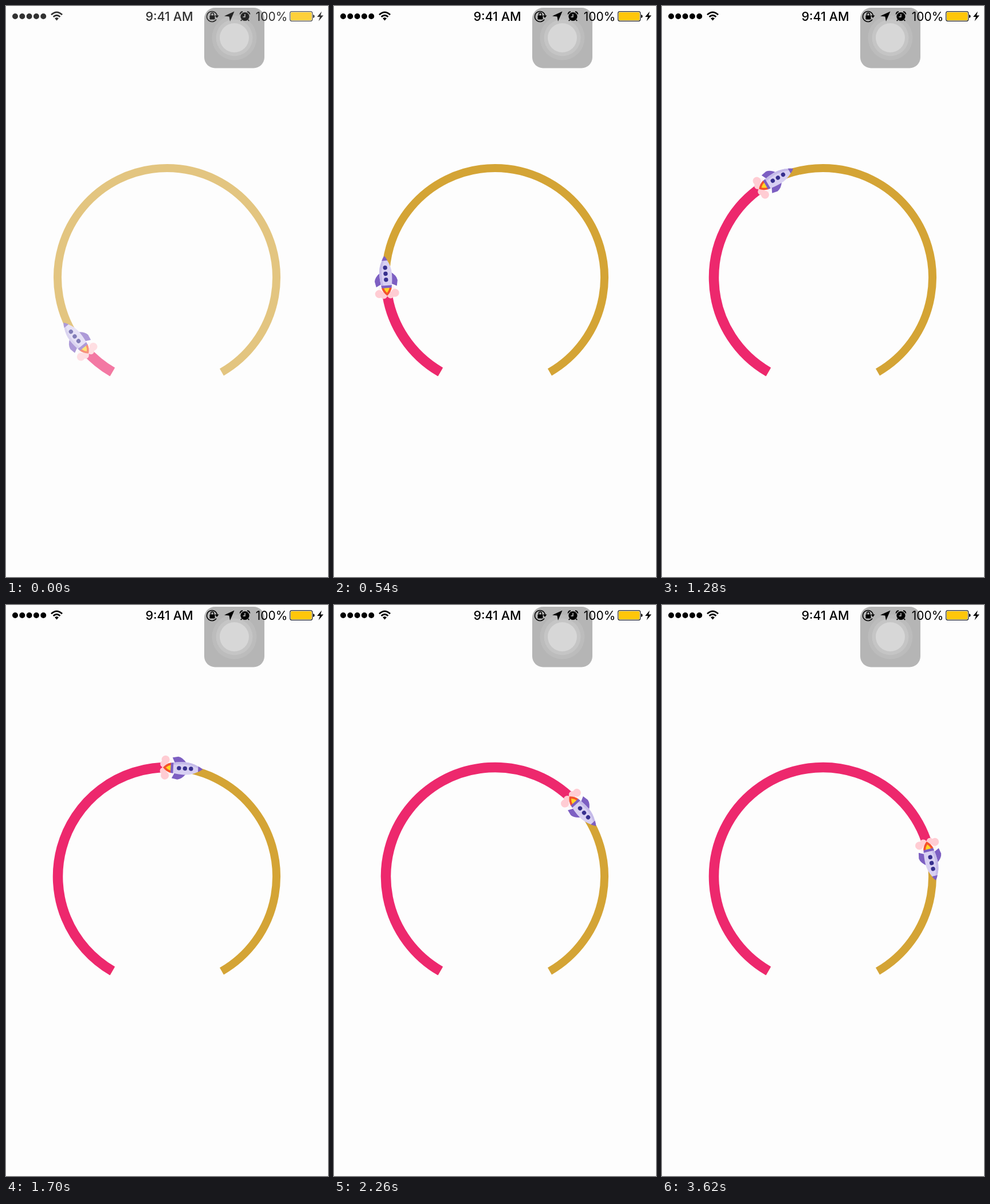
These frames come from a looping animation (562x997 px, 3720 ms). An HTML page:

```html
<!DOCTYPE html>
<html>
<head>
<meta charset="utf-8">
<style>
html, body { margin: 0; width: 100%; height: 100%; overflow: hidden; background: #fdfdfd; }
svg { display: block; width: 100vw; height: 100vh; }
text { font-family: Inter, "Liberation Sans", sans-serif; text-anchor: middle; }
</style>
</head>
<body>
<svg viewBox="0 0 562 997">
  <rect width="562" height="997" fill="#fdfdfd"/>

  <g id="gauge" fill="none">
    <path id="track" stroke="#d4a435" stroke-width="14"/>
    <path id="bar" stroke="#ed286d" stroke-width="17.5"/>
    <g id="rocket">
      <path fill="#fdf3f5" d="M-12 16H12L17 23L12 33H-12L-17 23Z"/>
      <g fill="#ffccd3">
        <circle cx="-14" cy="28" r="7"/>
        <circle cx="14" cy="28" r="7"/>
        <circle cx="-6" cy="31" r="6"/>
        <circle cx="6" cy="31" r="6"/>
      </g>
      <path fill="#f4512c" d="M-9 18H9Q7 26 0 32Q-7 26 -9 18Z"/>
      <path fill="#ffd526" d="M-5 18H5Q4 23 0 27Q-4 23 -5 18Z"/>
      <path fill="#7d5fc2" d="M-9 -9Q-19 -2 -20 6L-18 16L-8 11ZM9 -9Q19 -2 20 6L18 16L8 11Z"/>
      <path fill="#d8d0f2" d="M-4.5 -30H4.5Q11 -18 11 -6Q11 6 9 15H-9Q-11 6 -11 -6Q-11 -18 -4.5 -30Z"/>
      <path fill="#c5bbe9" d="M-4.5 -30H-1Q-7 -16 -7 -5Q-7 6 -5 15H-9Q-11 6 -11 -6Q-11 -18 -4.5 -30Z"/>
      <path fill="#7d5fc2" d="M-5 -29.5Q-2.5 -35 0 -37.5Q2.5 -35 5 -29.5ZM-9.5 14H9.5L8.5 18.5H-8.5Z"/>
      <g fill="#37308e">
        <circle cy="-17" r="3.7"/>
        <circle cy="-6.5" r="3.7"/>
        <circle cy="4" r="3.7"/>
      </g>
    </g>
  </g>

  <rect x="346" y="3" width="105" height="105.5" rx="19" fill="#b5b5b5"/>
  <circle cx="398.5" cy="55.5" r="39" fill="#bcbcbc"/>
  <circle cx="398.5" cy="55.5" r="32" fill="#c5c5c5"/>
  <circle cx="398.5" cy="55.5" r="25.5" fill="#d7d7d7"/>

  <g id="status">
    <path d="M16 18h49.3" stroke="#000" stroke-width="10" stroke-linecap="round" stroke-dasharray="0 12.3"/>
    <g fill="none" stroke="#000" stroke-width="2.8">
      <path d="M79 15.3Q88.5 6.5 98 15.3"/>
      <path d="M82.6 19Q88.5 13.4 94.4 19"/>
    </g>
    <path d="M85 21.4Q88.5 18.4 92 21.4L88.5 25.5Z"/>
    <text x="285" y="25.5" font-size="21.5" font-weight="500">9:41 AM</text>

    <path d="M367 23.5A9 9 0 1 1 368.4 17" fill="none" stroke="#000" stroke-width="1.6"/>
    <path d="M364.5 16.5H371.5L368 21Z"/>
    <rect x="355.5" y="16.5" width="9" height="7" rx=".8"/>
    <path d="M357.5 17V14.5a2.5 2.5 0 0 1 5 0V17" fill="none" stroke="#000" stroke-width="1.5"/>

    <path d="M398.5 9.5L391 27L389.5 18.5L381 17.5Z"/>

    <circle cx="417" cy="18.5" r="7.6"/>
    <path d="M408.5 14.5Q409 10.5 413 10M425.5 14.5Q425 10.5 421 10M411.5 24L409.8 26M422.5 24L424.2 26" fill="none" stroke="#000" stroke-width="1.8"/>
    <path d="M417 14V19H413.5" fill="none" stroke="#c4c4c4" stroke-width="1.5"/>

    <text x="463.5" y="25.5" font-size="21">100%</text>
    <rect x="495.7" y="9.7" width="39" height="16.6" rx="3" fill="#fdfdfd" stroke="#222" stroke-width="1.2"/>
    <rect x="497" y="11" width="36.4" height="14" rx="1.6" fill="#ffc60a"/>
    <path d="M536 15Q538.6 15.5 538.6 18Q538.6 20.500 536 21Z"/>
    <path d="M551 9.500L543 19H548L545.500 26.500L554 16.500H549Z"/>
  </g>
</svg>
<script>
const LOOP = 3720, CX = 281, CY = 474;
const START = 120, FIRST = 25.5, LAST = 231;   // degrees
const SPEED = 3.75, LAG = 4.5;
const el = id => document.getElementById(id);

function point(deg, r) {
  const a = deg * Math.PI / 180;
  return [CX + r * Math.cos(a), CY + r * Math.sin(a)];
}

function arc(sweep, r) {
  return `M${point(START, r)}A${r} ${r} 0 ${+(sweep > 180)} 1 ${point(START + sweep, r)}`;
}

// Three steps every 140 ms: two short holds, then a long one.
function stepAt(t) {
  const cycle = Math.floor((t - 120) / 140);
  const rest = t - 120 - cycle * 140;
  return 2 + 3 * cycle + Math.min(2, Math.floor(rest / 20));
}

function draw(t) {
  const n = stepAt(t);
  const sweep = Math.min(LAST, Math.max(FIRST, 60 + SPEED * (n - 11)));
  const angle = START + sweep;
  el("bar").setAttribute("d", arc(sweep - 7, 190.5));
  el("rocket").setAttribute("transform",
    `translate(${point(angle, 190.5)}) rotate(${angle - 180 - LAG})`);
  el("gauge").setAttribute("opacity", Math.min(1, 0.62 + 0.2 * n));
  el("status").setAttribute("opacity", Math.min(1, 0.8 + 0.1 * n));
}

el("track").setAttribute("d", arc(300, 191));
const begin = performance.now();
function tick() {
  draw((performance.now() - begin) % LOOP);
  requestAnimationFrame(tick);
}
draw(0);
requestAnimationFrame(tick);
</script>
</body>
</html>
```
